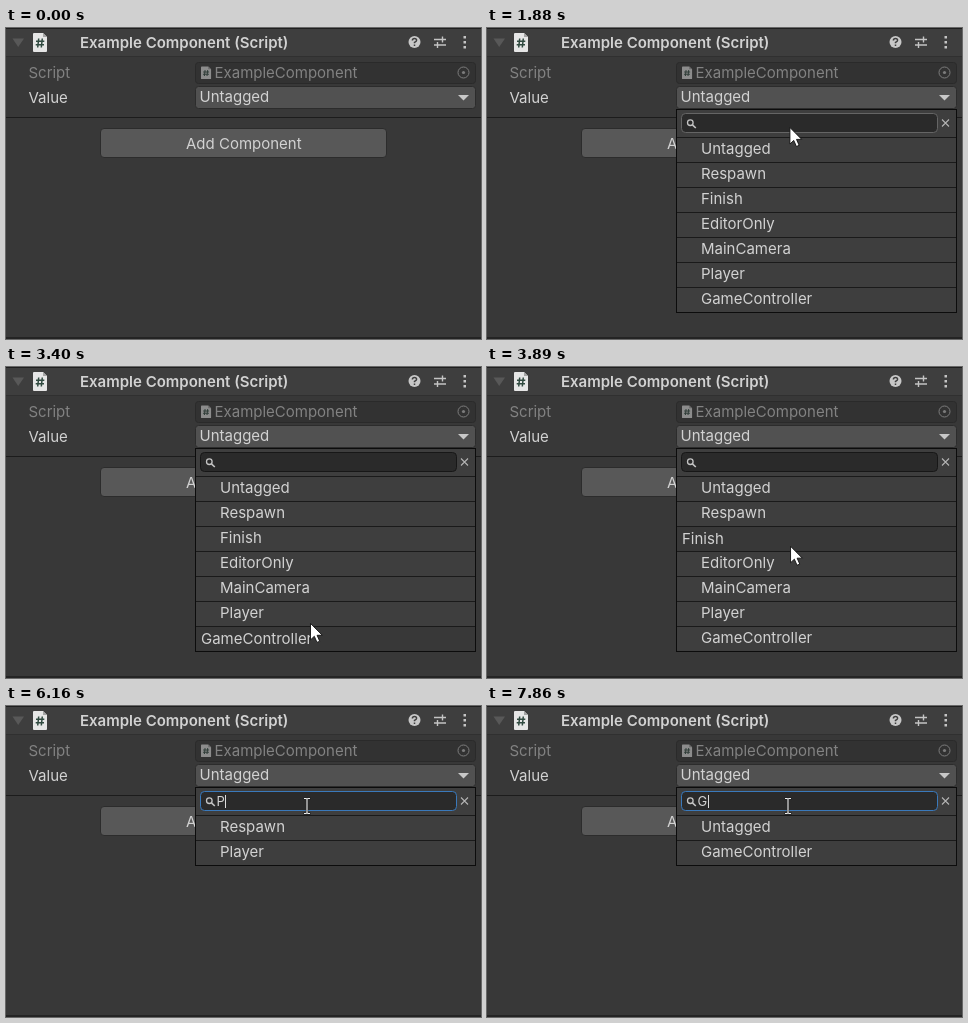
An HTML page that plays this animation: 475 px wide and 311 px high, repeating every 8000 ms.

```html
<!DOCTYPE html>
<html lang="en">
<head>
<meta charset="utf-8">
<title>Searchable tag dropdown</title>
<style>
html, body { margin: 0; width: 100%; height: 100%; overflow: hidden; background: #383838; }
svg { display: block; width: 475px; height: 311px; }
text { font: 15px Inter, "Liberation Sans", sans-serif; fill: #d2d2d2; white-space: pre; }
.title { font-weight: 600; }
.dim { fill: #828282; }
#query { font-size: 13px; }
</style>
</head>
<body>
<svg viewBox="0 0 475 311">
  <defs>
    <g id="scriptIcon">
      <path d="M1 0H10L14 4V18Q14 19 13 19H1Q0 19 0 18V1Q0 0 1 0Z" fill="#e6e6e6"/>
      <path d="M10 0V4H14Z" fill="#a5a5a5"/>
      <path d="M5.7 5.5 4.7 14.5M9.3 5.5 8.3 14.5M3 8.3H11.3M2.7 11.8H11" stroke="#304a40" stroke-width="1.5" fill="none"/>
    </g>
  </defs>

  <rect width="475" height="311" fill="#383838"/>
  <rect width="475" height="28" fill="#3e3e3e"/>
  <rect width="475" height="1" fill="#1f1f1f"/>
  <rect y="28" width="475" height="1" fill="#303030"/>
  <rect y="89" width="475" height="1" fill="#1c1c1c"/>
  <rect y="309" width="475" height="2" fill="#242424"/>

  <path d="M6.5 10.5H18L12.2 19Z" fill="#585858"/>
  <use href="#scriptIcon" x="27" y="5"/>
  <text class="title" x="74" y="20">Example Component (Script)</text>
  <circle cx="408.5" cy="14" r="6" fill="#c8c8c8"/>
  <path d="M406.4 12.4Q406.4 10.4 408.5 10.4T410.6 12.3Q410.6 13.3 408.5 14.4V15.3M408.5 16.6V18" stroke="#3e3e3e" stroke-width="1.5" fill="none"/>
  <path d="M428 11.5H440M428 17H440M436.5 8.5V14.5M431.5 14V20" stroke="#c4c4c4" stroke-width="1.4"/>
  <path d="M457.5 8H460V10.5H457.5ZM457.5 13H460V15.5H457.5ZM457.5 18H460V20.5H457.5Z" fill="#c4c4c4"/>

  <text class="dim" x="22.5" y="50">Script</text>
  <rect x="189.5" y="34.5" width="280" height="21" rx="3" fill="#323232" stroke="#2a2a2a"/>
  <use href="#scriptIcon" transform="translate(195 38.5) scale(.72 .66)" opacity=".5"/>
  <text class="dim" x="208.5" y="50">ExampleComponent</text>
  <circle cx="457.5" cy="44.5" r="5.5" fill="none" stroke="#7c7c7c"/>
  <circle cx="457.5" cy="44.5" r="1.6" fill="#7c7c7c"/>

  <text x="22.5" y="75">Value</text>
  <rect id="dropdown" x="189.5" y="58.5" width="280" height="22" rx="3" stroke="#2c2c2c"/>
  <text x="193.5" y="74">Untagged</text>
  <path d="M452 67H463L457.5 72.5Z" fill="#c8c8c8"/>

  <rect x="94.5" y="100.5" width="286" height="29" rx="3.5" fill="#585858" stroke="#2c2c2c"/>
  <text x="180" y="121">Add Component</text>

  <g id="popup">
    <rect id="panel" x="189.5" y="81.5" width="280" fill="#3e3e3e" stroke="#0c0c0c"/>
    <rect id="field" x="194.5" y="85.5" width="256" height="19" rx="4" fill="#2a2a2a"/>
    <circle cx="203.3" cy="94.7" r="2.8" fill="none" stroke="#c4c4c4" stroke-width="1.3"/>
    <path d="M205.4 96.8 208.8 100" stroke="#c4c4c4" stroke-width="1.6"/>
    <path d="M455 91.5 462 98.5M462 91.5 455 98.5" stroke="#b4b4b4" stroke-width="1.1"/>
    <text id="query" x="210.5" y="100"></text>
    <rect id="caret" y="89" width="1" height="13" fill="#dcdcdc"/>
    <g id="rows"></g>
  </g>

  <path id="arrow" d="M0 0V16.5L3.8 12.9 6.5 19 9.2 17.8 6.6 11.9H11.8Z" fill="#fff" stroke="#111" stroke-width=".9"/>
  <g id="beam" fill="none">
    <path d="M-3.5 -7.5H3.5M-3.5 7.5H3.5M0 -7.5V7.5" stroke="#222" stroke-width="2.4"/>
    <path d="M-3 -7.5H-1L0 -6.8 1 -7.5H3M-3 7.5H-1L0 6.8 1 7.5H3M0 -7V7" stroke="#eee" stroke-width="1.1"/>
  </g>
</svg>

<script>
const LOOP = 8000, STEP = 49.4, TOP = 109, PITCH = 25;
const OPEN = 1260, FOCUS = 4730;
const TAGS = ["Untagged", "Respawn", "Finish", "EditorOnly", "MainCamera", "Player", "GameController"];
const TYPED = [[0, ""], [6160, "P"], [6410, "Pl"], [7110, "P"], [7440, ""], [7860, "G"]];

// Pointer strokes: [time, x, y]; at rest between strokes.
const STROKES = [
  [[400, 288, 303], [700, 311, 195], [960, 309, 90], [1165, 303, 54], [1205, 302.5, 68.5]],
  [[1540, 302.5, 68.5], [1900, 303, 108], [2330, 303, 171], [2430, 303.5, 188.5], [3025, 304.5, 274]],
  [[3250, 304.5, 274], [3400, 304.5, 256.5], [4040, 303, 149], [4535, 301, 100]]
];

const $ = id => document.getElementById(id);
const set = (el, attrs) => { for (const k in attrs) el.setAttribute(k, attrs[k]); };
const show = (el, on) => set(el, { visibility: on ? "inherit" : "hidden" });
const latest = (list, t, time) => list.filter(e => time(e) <= t).pop();

function make(tag, parent, attrs) {
  const el = document.createElementNS("http://www.w3.org/2000/svg", tag);
  set(el, attrs);
  return parent.appendChild(el);
}

const rows = TAGS.map((_, i) => {
  const g = make("g", $("rows"), {}), y = TOP + i * PITCH;
  return {
    g,
    back: make("rect", g, { x: 190, y, width: 279, height: PITCH }),
    line: make("rect", g, { x: 190, y, width: 279, height: 1, fill: "#1a1a1a" }),
    label: make("text", g, {})
  };
});

// Hermite curve through the points, standing still at both ends.
function along(points, t) {
  const last = points.length - 1;
  if (t >= points[last][0]) return points[last].slice(1);
  const i = Math.max(0, points.findIndex(p => p[0] > t) - 1);
  const slope = (k, c) => k === 0 || k === last ? 0 :
    (points[k + 1][c] - points[k - 1][c]) / (points[k + 1][0] - points[k - 1][0]);
  const a = points[i], b = points[i + 1], d = b[0] - a[0], u = (t - a[0]) / d;
  return [1, 2].map(c =>
    a[c] * (1 + 2 * u) * (1 - u) ** 2 + b[c] * u * u * (3 - 2 * u) +
    d * u * (1 - u) * (slope(i, c) * (1 - u) - slope(i + 1, c) * u));
}

function pointer(t) {
  const stroke = latest(STROKES, t, s => s[0][0]);
  if (!stroke) return null;
  const start = stroke[0][0], end = stroke[stroke.length - 1][0];
  if (t >= end) return along(stroke, end);
  return along(stroke, start + STEP * (Math.floor((t - start) / STEP) + .05));
}

function drawPointer(t, pos) {
  const beam = pos && t > 4090 && pos[1] < 105 && !(t >= 4780 && t < 4930);
  show($("arrow"), pos && !beam);
  show($("beam"), beam);
  if (pos) {
    const transform = `translate(${pos[0]} ${pos[1]})`;
    set($("arrow"), { transform });
    set($("beam"), { transform });
  }
}

function drawPopup(t, pos) {
  show($("popup"), t >= OPEN);
  if (t < OPEN) return;
  const query = latest(TYPED, t, e => e[0])[1];
  const found = TAGS.filter(tag => tag.toLowerCase().includes(query.toLowerCase()));
  const hover = Math.floor((pos[1] - TOP + 4) / PITCH);
  const focused = t >= FOCUS, over = pos[1] < 105 && pos[1] > 84;

  set($("panel"), { height: TOP + found.length * PITCH - 81 });
  set($("field"), { stroke: focused ? "#3a79bb" : over ? "#656565" : "#171717" });
  $("query").textContent = query;
  show($("caret"), focused);
  set($("caret"), { x: Math.round(211 + (query ? $("query").getComputedTextLength() : 0)) });

  rows.forEach((row, i) => {
    show(row.g, i < found.length);
    const on = i === hover;
    row.label.textContent = found[i] || "";
    set(row.label, { x: on ? 195 : 214, y: TOP + i * PITCH + (on ? 18 : 17) });
    set(row.back, { fill: on ? "#383838" : "#3e3e3e" });
  });
}

function draw(t) {
  const pos = pointer(t);
  set($("dropdown"), { fill: t >= 1200 && t < OPEN ? "#585858" : "#515151" });
  drawPopup(t, pos);
  drawPointer(t, pos);
}

const began = performance.now();
function tick() {
  draw((performance.now() - began) % LOOP);
  requestAnimationFrame(tick);
}
tick();
</script>
</body>
</html>
```
